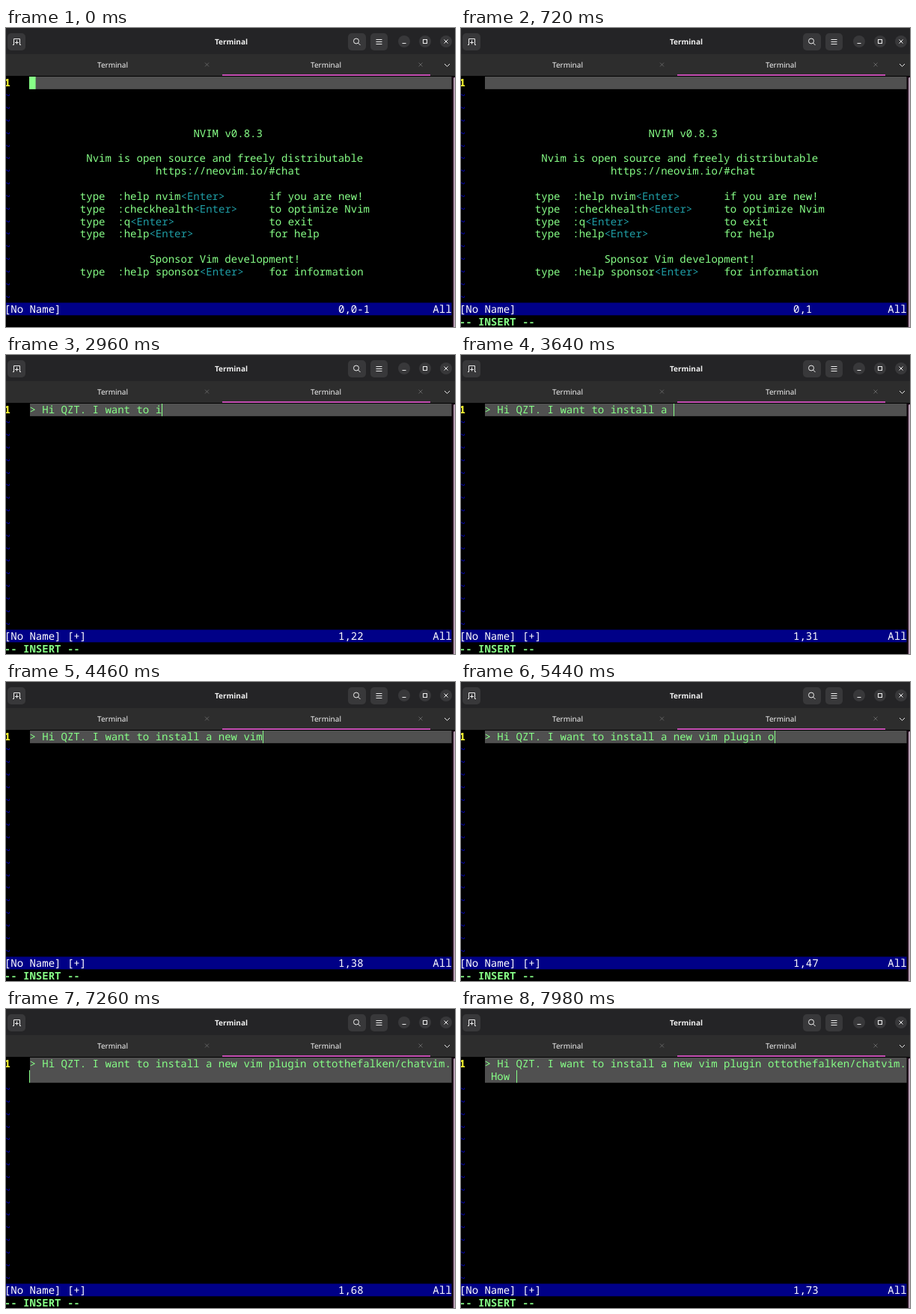
These frames come from a looping animation (600 px wide and 400 px high, 8000 ms). An HTML page:

```html
<!DOCTYPE html>
<html lang="en">
<head>
<meta charset="utf-8">
<title>Terminal</title>
<style>
  html, body { margin: 0; width: 100%; height: 100%; overflow: hidden; background: #000; }
  svg { display: block; width: 600px; height: 400px; }
  text { white-space: pre; text-rendering: geometricPrecision; }
  .mono { font: 500 14.03px "Noto Sans Mono", "DejaVu Sans Mono", monospace; fill: #87ff87; }
  .ui { font: 500 10px "Noto Sans", "Open Sans", sans-serif; fill: #f2f2f2; text-anchor: middle; }
  .ui.bold, .mono.bold, .mono.num { font-weight: 700; }
  .mono.key { fill: #1f9ea6; }
  .mono.tilde { fill: #0000c0; }
  .mono.num { fill: #ffff30; }
  .mono.status { fill: #fff; }
  .btn { fill: #38383a; }
  .icon { fill: none; stroke: #eee; stroke-width: 1; }
  .dim { stroke: #626262; }
</style>
</head>
<body>
<svg viewBox="0 0 600 400">
  <rect width="600" height="400"/>

  <!-- title bar -->
  <rect width="600" height="36" fill="#242426"/>
  <rect y="35" width="600" height="29" fill="#2d2d2d"/>
  <rect x="289" y="62" width="278" height="2" fill="#c64fb4"/>
  <g class="btn">
    <rect x="2" y="7" width="24" height="23" rx="5"/>
    <rect x="457" y="7" width="24" height="23" rx="5"/>
    <rect x="487" y="7" width="23" height="23" rx="5"/>
    <circle cx="532" cy="18" r="8"/>
    <circle cx="560" cy="18" r="8"/>
    <circle cx="588" cy="18" r="8"/>
  </g>
  <g class="icon">
    <path d="M9 22.5H10.500V14.500H18.500V22.500H20M14.500 16.500V21.500M12 19.500H17"/>
    <circle cx="468" cy="17.500" r="3.500"/>
    <path d="M470.500 20L473.500 23"/>
    <path d="M494.500 15.500H502.500M494.500 18.500H502.500M494.500 21.500H502.500"/>
    <path d="M529.500 20.500H534.500"/>
    <rect x="557.500" y="15.500" width="5" height="5"/>
    <path d="M585.500 15.500L590.500 20.500M590.500 15.500L585.500 20.500"/>
    <path d="M586 48L589.500 51.500L593 48"/>
    <path class="dim" d="M266 46.500L271 51.500M271 46.500L266 51.500M551.500 46.500L556.500 51.500M556.500 46.500L551.500 51.500"/>
  </g>
  <text class="ui bold" x="301" y="22">Terminal</text>
  <text class="ui" x="142.500" y="52.600">Terminal</text>
  <text class="ui" x="427.500" y="52.600">Terminal</text>

  <!-- editor -->
  <rect id="line" x="32" y="65" width="563.500" height="16.840" fill="#505050"/>
  <rect y="367.500" width="595.500" height="16.800" fill="#000087"/>
  <rect x="596" y="65" width="4" height="335" fill="#1c0a18"/>
  <rect x="598" y="66" width="3" height="340" rx="1.500" fill="#b8a0b4"/>
  <g id="tildes"></g>
  <g id="intro"></g>
  <g id="live"></g>
  <rect id="cursor" y="65" height="16.840" fill="#87ff87"/>
</svg>
<script>
const LOOP = 8000, CELL = 8.42, ROW = 16.84, LEFT = -2.2, TOP = 65;
const COLS = 67, GUTTER = 4, INSERT_AT = 400;
const TEXT = "> Hi QZT. I want to install a new vim plugin ottothefalken/chatvim. How ";

// typing bursts: first key, last key, number of keys
const BURSTS = [
  [820, 1380, 5], [1520, 1560, 3], [1840, 1940, 2], [2240, 2680, 10],
  [2960, 3340, 8], [3530, 4040, 6], [4200, 4320, 3], [4510, 5040, 7],
  [5180, 5200, 2], [5490, 5740, 5], [6000, 6300, 6], [6420, 6600, 5],
  [6790, 7120, 4], [7260, 7280, 2], [7740, 7980, 4]
];
const keys = BURSTS.flatMap(([a, b, n]) =>
  Array.from({ length: n }, (_, i) => a + (b - a) * i / (n - 1)));

const $ = id => document.getElementById(id);
const colX = c => LEFT + c * CELL;

function put(parent, row, col, str, cls = "") {
  const el = document.createElementNS("http://www.w3.org/2000/svg", "text");
  el.setAttribute("class", "mono " + cls);
  el.setAttribute("x", colX(col));
  el.setAttribute("y", TOP + 13.3 + row * ROW);
  el.textContent = str;
  $(parent).append(el);
  return el;
}

const tildes = Array.from({ length: 17 }, (_, i) => put("tildes", i + 1, 0, "~", "tilde"));

put("intro", 4, 30, "NVIM v0.8.3");
put("intro", 6, 13, "Nvim is open source and freely distributable");
put("intro", 7, 24, "https://neovim.io/#chat");
put("intro", 14, 23, "Sponsor Vim development!");
[
  [9, ":help nvim", "if you are new!"],
  [10, ":checkhealth", "to optimize Nvim"],
  [11, ":q", "to exit"],
  [12, ":help", "for help"],
  [15, ":help sponsor", "for information"]
].forEach(([row, cmd, note]) => {
  put("intro", row, 12, "type  " + cmd);
  put("intro", row, 18 + cmd.length, "<Enter>", "key");
  put("intro", row, 42, note);
});

put("live", 0, 0, "1", "num");
const first = put("live", 0, GUTTER, "");
const second = put("live", 1, GUTTER, "");
const file = put("live", 18, 0, "", "status");
const ruler = put("live", 18, 53, "", "status");
put("live", 18, 68, "All", "status");
const mode = put("live", 19, 0, "-- INSERT --", "bold");

const show = (el, on) => el.setAttribute("visibility", on ? "visible" : "hidden");

function draw(t) {
  const n = keys.filter(k => k <= t + 0.01).length;
  const insert = t >= INSERT_AT;
  const wrapped = n >= COLS;

  first.textContent = TEXT.slice(0, Math.min(n, COLS));
  second.textContent = TEXT.slice(COLS, Math.max(n, COLS));
  file.textContent = n ? "[No Name] [+]" : "[No Name]";
  ruler.textContent = n ? "1," + (n + 1) : insert ? "0,1" : "0,0-1";

  show($("intro"), !n);
  show(mode, insert);
  show(tildes[0], !wrapped);
  $("line").setAttribute("height", wrapped ? ROW * 2 : ROW);

  const cur = $("cursor");
  show(cur, n || !insert);
  cur.setAttribute("x", Math.round(colX(GUTTER + n % COLS)));
  cur.setAttribute("y", TOP + (wrapped ? ROW : 0));
  cur.setAttribute("width", insert ? 1 : 8.6);
}

function tick() {
  draw(performance.now() % LOOP);
  requestAnimationFrame(tick);
}
tick();
</script>
</body>
</html>
```
